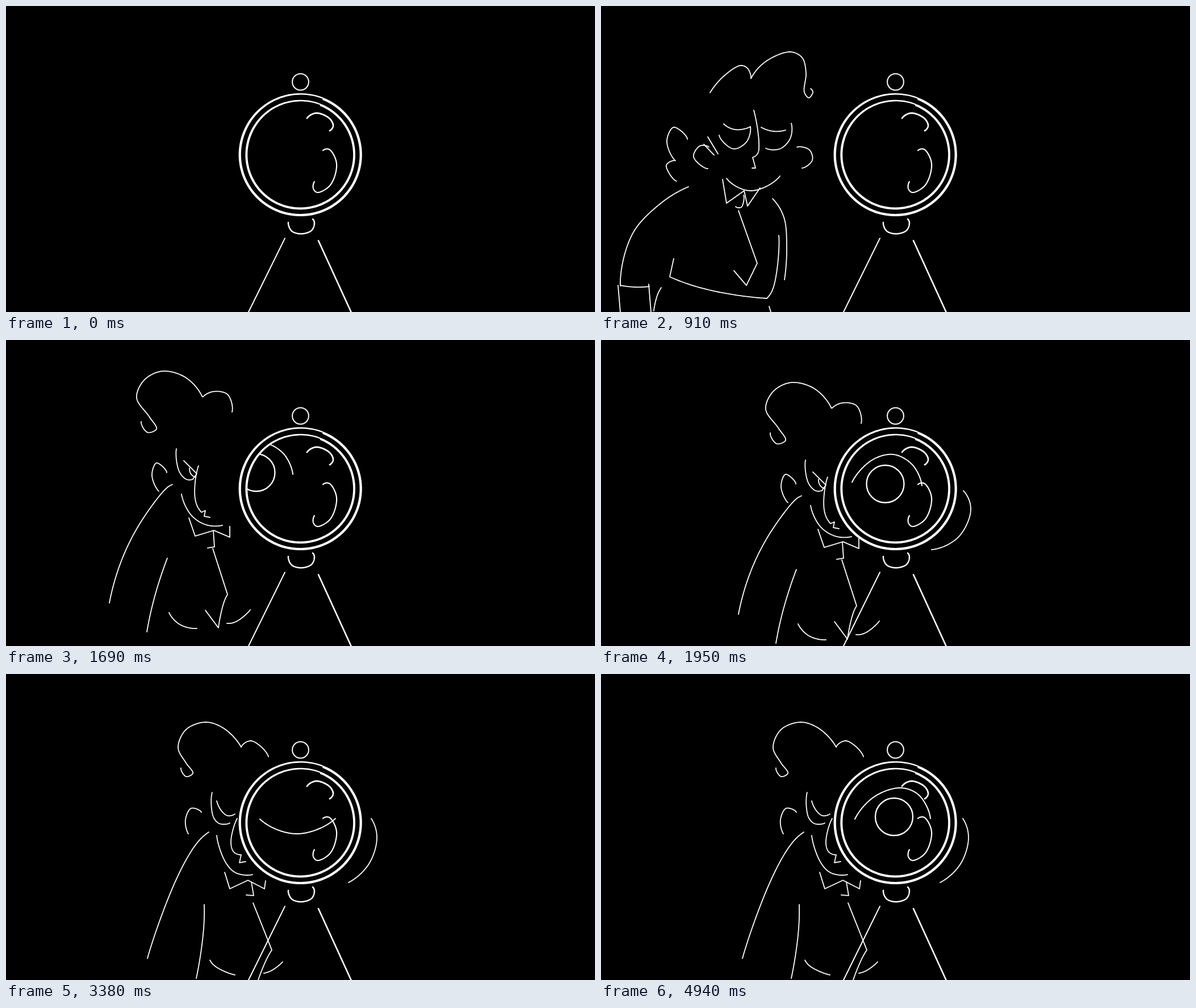
Write an HTML page with a canvas that moves like this. It is 1037x540 px and loops after 6.5 s.

```html
<!DOCTYPE html>
<html lang="en">
<head>
<meta charset="utf-8">
<title>Magnifying glass</title>
<style>
  html, body { margin: 0; width: 100%; height: 100%; overflow: hidden; background: #000; }
  canvas { display: block; }
</style>
</head>
<body>
<canvas id="stage" width="1037" height="540"></canvas>
<script>
const ctx = document.getElementById('stage').getContext('2d');
const STEP = 130, LOOP = 6500, SAMPLES = 120;
const LENS = { x: 518.2, y: 262.5, r: 108.6 };
const BLINKS = [18, 26, 30, 37];

// Point opposite c on the circle through a, b and c, so that open ends keep their bend.
function mirror(a, b, c = [2 * b[0] - a[0], 2 * b[1] - a[1]]) {
  const dx = b[0] - a[0], dy = b[1] - a[1];
  const along = (c[0] - (a[0] + b[0]) / 2) * dx + (c[1] - (a[1] + b[1]) / 2) * dy;
  const k = 2 * along / (dx * dx + dy * dy);
  return [c[0] - k * dx, c[1] - k * dy];
}

// Centripetal spline from b to c with neighbours a and d.
function segment(a, b, c, d) {
  const gap = (p, q) => Math.sqrt(Math.hypot(q[0] - p[0], q[1] - p[1])) || 1;
  const ab = gap(a, b), bc = gap(b, c), cd = gap(c, d);
  return f => [0, 1].map(k => {
    const step = c[k] - b[k];
    const m = step + bc * ((b[k] - a[k]) / ab - (c[k] - a[k]) / (ab + bc));
    const n = step + bc * ((d[k] - c[k]) / cd - (d[k] - b[k]) / (bc + cd));
    return b[k] + f * (m + f * (3 * step - 2 * m - n + f * (m + n - 2 * step)));
  });
}

// A stroke runs smoothly through its key points; "|" makes a corner.
function stroke(text) {
  const segments = [];
  let corner = [];
  for (const part of text.split('|')) {
    const pts = [...corner, ...part.trim().split(' ').map(p => p.split(',').map(Number))];
    corner = pts.slice(-1);
    const [z, y, x] = pts.slice().reverse();
    const all = [mirror(...pts.slice(0, 3)), ...pts, mirror(z, y, x)];
    for (let i = 0; i + 3 < all.length; i++) segments.push(segment(...all.slice(i, i + 4)));
  }
  return Array.from({ length: SAMPLES + 1 }, (_, n) => {
    const u = n / SAMPLES * segments.length;
    const i = Math.min(segments.length - 1, Math.floor(u));
    return segments[i](u - i);
  });
}

const strokes = parts => Object.fromEntries(
  Object.entries(parts).map(([name, text]) => [name, stroke(text)]));

const shy = strokes({
  hair: '192,153 217,123 246,105 258,110 264,128 | 290,98 333,81 354,91 361,118 358,152 366,162 373,152 369,146',
  curls: '152,235 128,214 116,238 131,273 | 115,281 133,309',
  ear: '190,249 174,247 163,266 188,287',
  burn1: '181,244 199,263',
  burn2: '188,231 206,261',
  lidL: '216,208 236,218 263,213',
  eyeL: '208,228 233,252 256,240 263,213',
  nose: '269,184 278,240 276,260 267,267 | 272,286 | 266,286',
  lidR: '282,214 303,221 325,219',
  eyeR: '290,251 315,252 333,234 335,207',
  farEar: '345,249 367,254 372,272 354,286',
  mouth: '221,304 264,326 315,300',
  collar: '214,306 221,348 | 252,326 | 258,353 | 280,321',
  tie: '251,334 247,355 237,354',
  back: '154,319 103,350 55,403 34,494',
  sleeve: '30,493 34,540',
  cuff: '34,493 60,496 85,495',
  wrist: '84,491 88,540',
  palm: '106,497 99,511 93,538',
  arm: '128,446 121,478 | 190,501 292,516 | 304,495 313,405',
  front: '302,340 322,373 327,425 323,483',
  lapel: '242,361 275,454 | 256,493 | 234,467',
  leg: '296,530 299,540'
});
const look = strokes({
  hair: '236,131 250,90 284,68 299,98 | 316,73 350,63 390,83 393,120 382,152 391,164 402,154 397,150',
  curls: '181,215 157,200 149,225 163,257 | 146,272 157,295',
  ear: '217,212 203,210 189,235 215,265',
  burn1: '213,206 228,228',
  burn2: '219,200 231,223',
  browL: '258,204 276,197 296,207',
  pupilL: '288,202 278,212 288,223 297,212 288,202',
  socketL: '310,176 308,222 297,245 276,250',
  nose: '323,168 328,215 326,245 316,259 | 319,276 | 314,275',
  browR: '333,203 350,200 361,212',
  pupilR: '350,204 341,213 351,223 361,213 350,204',
  socketR: '373,186 373,225 362,245 341,249',
  jaw: '361,260 348,292 325,307 298,309',
  collar: '236,297 254,339 | 273,317 | 287,346 | 302,309',
  tie: '275,322 277,350 | 264,351',
  back: '186,305 130,333 95,372 57,470 51,540',
  cuff: '57,475 80,487 109,495',
  wrist: '116,489 103,540',
  arm: '110,472 104,486 | 160,493 260,518 308,520 318,505 319,450 312,383',
  front: '317,333 335,401 363,473 402,522',
  lapel: '274,359 291,415 302,474 | 285,513 273,512 256,483',
  leg: '300,532 306,540'
});
const reach = { ...look, ...strokes({
  thumb: '335,530 345,508 363,490',
  palm: '398,537 410,522 429,517 420,540',
  finger1: '430,530 448,526 467,525',
  finger2: '435,538 460,537'
}) };
const lean = strokes({
  hair: '298,164 309,183 325,177 312,155 290,122 303,91 335,75 376,86 406,121 | 425,111 450,116 458,147',
  ear: '343,254 325,237 317,258 329,287',
  socket: '360,212 365,252 378,266 390,265',
  lid: '373,233 396,256 | 390,264',
  iris: '383,246 386,257 394,262',
  nose: '399,242 393,300 404,324 | 411,321 | 409,331 | 419,333',
  jaw: '369,292 386,329 412,346 441,347',
  collar: '382,334 393,366 | 426,356 | 454,368 | 454,349',
  tie: '425,357 427,385 | 415,387',
  back: '353,275 341,283 295,345 263,410 242,484',
  inner: '344,405 322,472 308,535',
  lapel: '424,388 450,469 | 443,485 434,528 | 411,497',
  arm: '347,501 366,522 396,529',
  farArm: '449,520 465,517 490,496',
  cheek: '638,266 651,300 629,348 582,370'
});
const peer = strokes({
  hair: '308,166 317,181 329,175 317,157 303,130 317,98 352,85 385,97 414,129 | 432,118 462,146',
  ear: '344,244 326,237 316,257 321,282',
  socket: '363,209 365,252 376,264 394,263',
  lid: '371,224 379,241 390,250 403,247',
  nose: '407,255 396,297 401,314 414,319 | 411,333 | 422,331',
  jaw: '371,285 387,333 405,351 434,354',
  collar: '385,350 394,379 | 426,364 | 455,379 | 457,365',
  tie: '432,367 436,391 | 423,390',
  back: '357,279 335,300 300,362 249,502',
  inner: '349,407 347,460 335,537',
  lapel: '435,404 468,487 | 458,505 444,540',
  arm: '359,505 370,517 403,531',
  farArm: '454,528 468,523 487,508'
});
const cheek = { curve: stroke('637,255 647,289 633,335 597,368') };

const leanEye = { lid: stroke('442,251 477,212 515,202 548,220 565,257'), x: 500.5, y: 254 };
const peerEye = { lid: stroke('447,256 482,216 528,201 560,214 580,255'), x: 516, y: 252 };
const closedEye = { lid: stroke('447,256 512,282 580,255') };

const glass = [
  { line: stroke('530,198 546,189 569,198 576,211 570,220'), width: 2.8 },
  { line: stroke('558,255 569,253 582,278 571,316 548,329 541,322 543,310'), width: 2.2 },
  { line: stroke('497,382 503,397 520,402 538,396 543,383 540,376'), width: 2.5 },
  { line: stroke('491,410 426.5,541'), width: 2 },
  { line: stroke('550,414 608,541'), width: 2.6 }
];

// Shared strokes blend; the others belong to the nearer pose.
function mix(a, b, k) {
  const out = {};
  for (const name in { ...a, ...b }) {
    if (a[name] && b[name]) {
      out[name] = a[name].map((p, i) => p.map((v, j) => v + (b[name][i][j] - v) * k));
    } else {
      const only = (k < 0.5 ? a : b)[name];
      if (only) out[name] = only;
    }
  }
  return out;
}

function drawLine(pts, width) {
  ctx.lineWidth = width;
  ctx.beginPath();
  pts.forEach(p => ctx.lineTo(...p));
  ctx.stroke();
}

function circle(x, y, r) {
  ctx.beginPath();
  ctx.arc(x, y, r, 0, Math.PI * 2);
}

function drawPose(pose, dx = 0, dy = 0) {
  ctx.save();
  ctx.translate(dx, dy);
  for (const name in pose) drawLine(pose[name], 1.8);
  ctx.restore();
}

function drawEye(eye, dx = 0, dy = 0) {
  ctx.save();
  circle(LENS.x, LENS.y, 94);
  ctx.clip();
  ctx.translate(dx, dy);
  drawLine(eye.lid, 2);
  if (eye.x) {
    ctx.lineWidth = 2.3;
    circle(eye.x, eye.y, 33);
    ctx.stroke();
  }
  ctx.restore();
}

// A brush ring that thins out towards the end of its turn.
function ring(r, width) {
  const outer = [], inner = [];
  for (let i = 0; i <= 180; i++) {
    const u = i / 180, a = -1.19 + u * Math.PI * 2;
    const w = width - (width - 2.2) * Math.max(0, (u - 0.75) / 0.25);
    const at = q => [LENS.x + q * Math.cos(a), LENS.y + q * Math.sin(a)];
    outer.push(at(r));
    inner.unshift(at(r - w));
  }
  ctx.beginPath();
  [...outer, ...inner].forEach(p => ctx.lineTo(...p));
  ctx.fill();
}

function drawGlass() {
  ring(LENS.r, 4.2);
  ring(96.8, 3.9);
  ctx.lineWidth = 2;
  circle(518.5, 134, 14.4);
  ctx.stroke();
  for (const { line, width } of glass) drawLine(line, width);
}

// Rise from below, look up, step behind the lens, then peer through it.
function drawPerson(n) {
  if (n < 1) return;
  const left = n < 7 ? (6 - n) / 5 : 15 - n;
  if (n < 7) drawPose(shy, -12 * left, 3 + 370 * left * left);
  else if (n < 11) drawPose(mix(shy, look, [0, 0.5, 0.9, 0.9][n - 7]));
  else if (n < 13) drawPose(reach, 28 * (n - 11), -9 * (n - 11));
  else if (n < 16) drawPose(lean, -15 * left * left, -10 * left);
  else {
    drawPose(peer);
    drawPose(cheek, n < 18 ? 9 : BLINKS.includes(n) ? 6 : 0);
  }
}

function drawLensView(n) {
  const left = 15 - n;
  if (n >= 16) drawEye(BLINKS.includes(n) ? closedEye : peerEye);
  else if (n >= 13) drawEye(leanEye, -15 * left * left, -10 * left);
}

function draw(n) {
  ctx.fillStyle = '#000';
  ctx.fillRect(0, 0, 1037, 540);
  ctx.strokeStyle = '#fff';
  ctx.lineCap = ctx.lineJoin = 'round';
  drawPerson(n);
  // The lens hides whatever stands behind it.
  circle(LENS.x, LENS.y, LENS.r);
  ctx.fill();
  drawLensView(n);
  ctx.fillStyle = '#fff';
  drawGlass();
}

let start, shown = -1;
function tick(now) {
  start ??= now;
  const n = Math.floor((now - start) % LOOP / STEP);
  if (n !== shown) draw(shown = n);
  requestAnimationFrame(tick);
}
requestAnimationFrame(tick);
</script>
</body>
</html>
```
